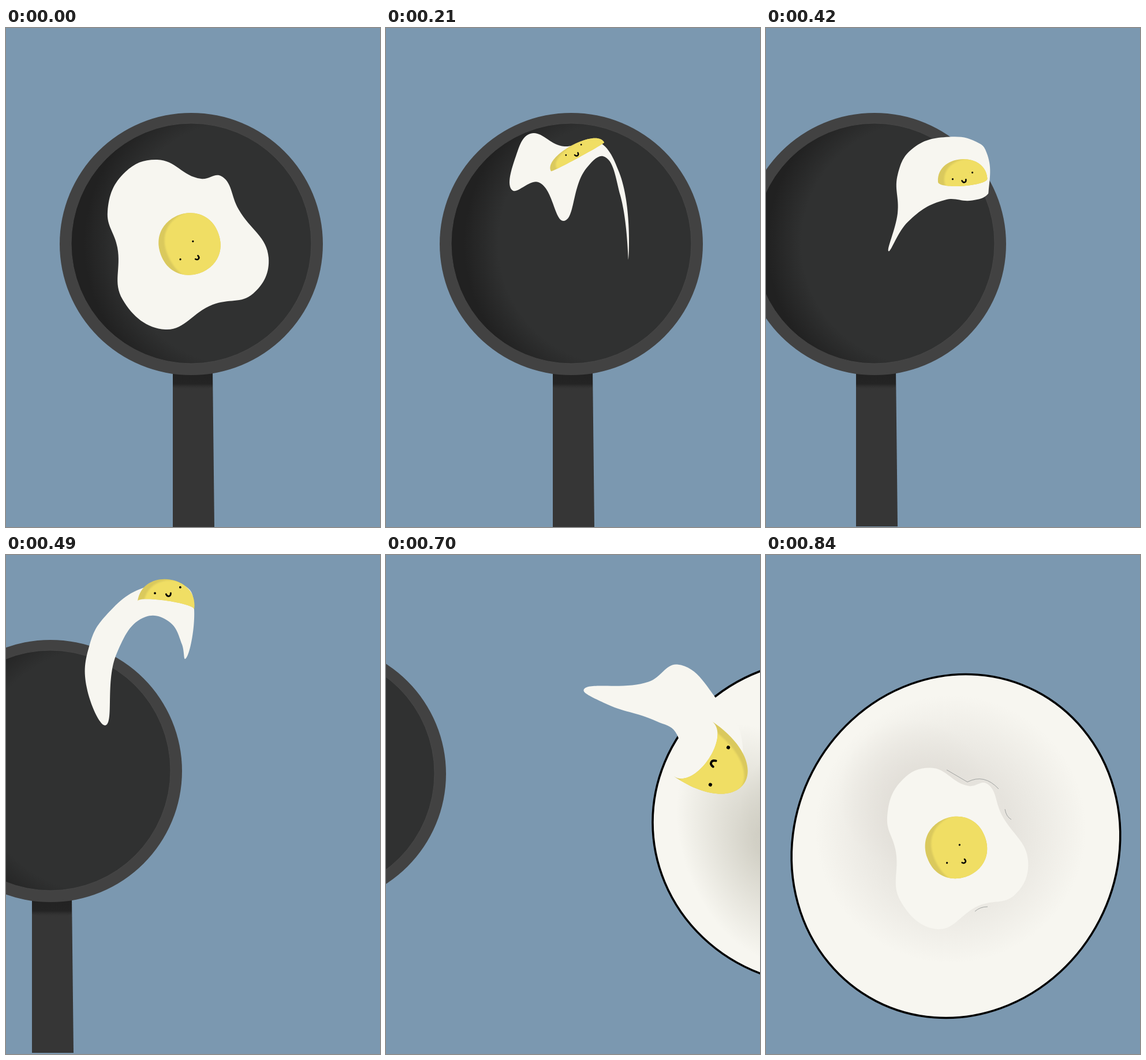
An HTML page with a canvas for the animation above (0.91 s loop, 648 by 864 pixels).

```html
<!DOCTYPE html>
<html lang="en">
<head>
<meta charset="utf-8">
<title>Flipping egg</title>
<style>
  html, body { margin: 0; width: 100%; height: 100%; overflow: hidden; background: #7b98b0; }
  canvas { display: block; }
</style>
</head>
<body>
<canvas id="stage" width="648" height="864"></canvas>
<script>
const ctx = document.getElementById('stage').getContext('2d');
const STEP = 70, STEPS = 13, TAU = Math.PI * 2;
const SKY = '#7b98b0', WHITE = '#f7f6f0', YOLK = '#f0de64', YOLK_DARK = '#dac95d';

// white: key points of a smooth outline, clockwise.
// yolk: two tips, then the bulge of the outer and the inner arc between them.
// face: centre between the eyes, angle, distance of the eyes, drop of the mouth.
const resting = {
  step: 0,
  white: [338,261, 372,256, 403,314, 455,398, 428,460, 358,479,
    276,522, 202,470, 193,380, 176,318, 207,249, 262,228],
  yolk: [268,392, 368,356, 53.4, -53.4],
  face: [313,385, -0.96, 38, 23]
};
const tossed = {
  step: 3,
  white: [309,205, 362,194, 404,250, 420,401, 406,290, 376,222,
    347,243, 308,334, 264,267, 219,281, 225,222, 250,183],
  yolk: [286,248, 378,198, 22, -2],
  face: [325,211, -0.6, 32, 10]
};
const caught = {
  step: 5,
  white: [425,343, 434,327, 461,388, 464,420, 433,482, 380,488,
    300,501, 253,478, 316,412, 312,350, 333,314, 385,324],
  yolk: [368,453, 441,427, 28, -28],
  face: [401,451, -0.41, 27, 11]
};
const flung = {
  step: 7,
  white: [315,57, 326,94, 310,180, 305,155, 282,115, 242,107,
    192,170, 172,295, 140,230, 145,155, 172,106, 250,53],
  yolk: [228,80, 326,94, 45, 8],
  face: [280,61, -0.23, 45, 8]
};
const flying = {
  step: 9,
  white: [602,131, 605,215, 545,248, 492,242, 504,205, 470,163,
    438,174, 375,186, 323,170, 410,113, 437,70, 560,107],
  yolk: [526,124, 513,249, 113, 28],
  face: [578,195, 1.57, 70, 13]
};
const landing = {
  step: 11,
  white: [625,480, 600,560, 525,550, 472,496, 508,494, 533,450,
    500,402, 378,325, 362,298, 500,326, 572,309, 612,425],
  yolk: [601,450, 484,517, 103, 39],
  face: [577,536, 2.47, 73, 11]
};
const moved = (v, i) => v + [11.5, 132.5][i % 2];
const served = {
  step: 12,
  white: resting.white.map((v, i) => i % 2 ? v * 0.95 + 152 : v * 0.875 + 56),
  yolk: [...resting.yolk.slice(0, 4).map(moved), ...resting.yolk.slice(4)],
  face: [...resting.face.slice(0, 2).map(moved), ...resting.face.slice(2)]
};
const poses = [resting, tossed, caught, flung, flying, landing, served];

const mix = (a, b, k) => a.map((v, i) => v + (b[i] - v) * k);

function poseAt(step) {
  const i = poses.findIndex(p => p.step >= step);
  const next = poses[i], prev = poses[Math.max(i - 1, 0)];
  const k = (step - prev.step) / (next.step - prev.step || 1);
  const part = name => mix(prev[name], next[name], k);
  return { white: part('white'), yolk: part('yolk'), face: part('face') };
}

// Handles shrink where the outline turns back, so tips stay sharp.
function blob(coords) {
  const n = coords.length / 2;
  const at = i => { const j = (i + n) % n * 2; return [coords[j], coords[j + 1]]; };
  const side = i => {
    const [ax, ay] = at(i), [bx, by] = at(i + 1);
    const length = Math.hypot(bx - ax, by - ay);
    return { x: (bx - ax) / length, y: (by - ay) / length, length };
  };
  const heading = i => {
    const a = side(i - 1), b = side(i);
    return [(a.x + b.x) / 2, (a.y + b.y) / 2];
  };
  const path = new Path2D();
  path.moveTo(...at(0));
  for (let i = 0; i < n; i++) {
    const [x, y] = at(i), [u, v] = at(i + 1);
    const h = side(i).length * 0.42;
    const [ax, ay] = heading(i), [bx, by] = heading(i + 1);
    path.bezierCurveTo(x + ax * h, y + ay * h, u - bx * h, v - by * h, u, v);
  }
  path.closePath();
  return path;
}

function yolkPath([ax, ay, bx, by, outer, inner]) {
  const d = Math.hypot(bx - ax, by - ay);
  const nx = (by - ay) / d * 4 / 3, ny = (ax - bx) / d * 4 / 3;
  const path = new Path2D();
  path.moveTo(ax, ay);
  path.bezierCurveTo(ax + nx * outer, ay + ny * outer, bx + nx * outer, by + ny * outer, bx, by);
  path.bezierCurveTo(bx + nx * inner, by + ny * inner, ax + nx * inner, ay + ny * inner, ax, ay);
  return path;
}

function ellipse(x, y, rx, ry, fill, tilt = 0) {
  ctx.beginPath();
  ctx.ellipse(x, y, rx, ry, tilt, 0, TAU);
  ctx.fillStyle = fill;
  ctx.fill();
}

function line(d, color, width) {
  ctx.strokeStyle = color;
  ctx.lineWidth = width;
  ctx.stroke(new Path2D(d));
}

function softSpot(x, y, rx, ry, rgb, alpha, tilt = 0, core = 0) {
  const g = ctx.createRadialGradient(0, 0, 0, 0, 0, 1);
  g.addColorStop(core, `rgba(${rgb},${alpha})`);
  g.addColorStop((1 + core) / 2, `rgba(${rgb},${alpha * 0.5})`);
  g.addColorStop(1, `rgba(${rgb},0)`);
  ctx.save();
  ctx.translate(x, y);
  ctx.rotate(tilt);
  ctx.scale(rx, ry);
  ellipse(0, 0, 1, 1, g);
  ctx.restore();
}

function drawPan(step) {
  const s = Math.max(step - 5, 0);
  const shift = 144 * s - 11 * s * s;
  ctx.save();
  ctx.translate(-shift, step >= 9 ? 5 : 0);

  ctx.fillStyle = '#363636';
  ctx.fill(new Path2D(`M289 590H358L361 ${864 - shift / 122}H289Z`));
  const cast = ctx.createLinearGradient(0, 600, 0, 627);
  cast.addColorStop(0, '#222222');
  cast.addColorStop(0.6, '#242424');
  cast.addColorStop(1, '#36363600');
  ctx.fillStyle = cast;
  ctx.fill(new Path2D('M289 590H358V622Q324 632 289 622Z'));

  ellipse(321, 374, 228, 227, '#424242');
  ellipse(321, 373, 208, 208, '#303131');
  const shadow = ctx.createRadialGradient(405, 373, 210, 405, 373, 270);
  shadow.addColorStop(0, 'rgba(33,33,33,0)');
  shadow.addColorStop(1, 'rgba(33,33,33,1)');
  ellipse(321, 373, 208, 208, shadow);
  ctx.strokeStyle = '#4c4c4c';
  ctx.lineWidth = 0.8;
  ctx.stroke();
  ctx.restore();
}

function drawPlate(step) {
  const k = STEPS - 1 - step;
  const x = 329 + 287 * k - 36 * k * k, y = 504 - 30 * k + 4.7 * k * k;
  const rx = 302 - 2.5 * k, ry = 280 + k, tilt = k ? 0 : -1.094;

  ellipse(x, y, rx, ry, WHITE, tilt);
  ctx.save();
  ctx.clip();
  ctx.translate(x, y);
  if (k === 0) {
    softSpot(-9, -29, 235, 232, '224,221,215', 0.75, 0, 0.45);
    softSpot(-74, -89, 130, 130, '220,216,209', 0.6);
  } else if (k < 3) {
    softSpot(-105, 37, 140, 215, '206,204,193', 0.9, -0.35, 0.1);
    softSpot(-60, -28, 85, 95, '200,198,187', 0.6);
    softSpot(75, -148, 175, 85, '212,210,201', 0.8);
  }
  ctx.restore();

  ctx.beginPath();
  ctx.ellipse(x, y, rx, ry, tilt, 0, TAU);
  ctx.strokeStyle = '#000';
  ctx.lineWidth = 3.6;
  ctx.stroke();
  if (k === 1) {
    ctx.fillStyle = '#000';
    ctx.fill(new Path2D('M297 574Q322 640 362 681V672Q325 625 297 574Z'));
  }
}

function drawFace([x, y, angle, spread, drop]) {
  ctx.save();
  ctx.translate(x, y);
  ctx.rotate(angle);
  for (const side of [-1, 1]) ellipse(side * spread / 2, 0, spread * 0.043, spread * 0.043, '#000');
  ctx.translate(0, drop);
  ctx.scale(0.4 + spread * 0.014, 0.4 + spread * 0.014);
  ctx.lineCap = 'round';
  line('M-4 -2C-3 4 3 4 4 -2', '#000', 2.8);
  ctx.restore();
}

function drawYolk(yolk) {
  const shape = yolkPath(yolk);
  ctx.fillStyle = YOLK_DARK;
  ctx.fill(shape);

  // The lit part slides from the first tip towards the second.
  const [ax, ay, bx, by, outer, inner] = yolk;
  const slide = 11 / Math.hypot(bx - ax, by - ay);
  ctx.save();
  ctx.clip(shape);
  ctx.translate((bx - ax) * slide, (by - ay) * slide);
  ctx.filter = 'blur(1.5px)';
  ctx.fillStyle = YOLK;
  ctx.fill(yolkPath([ax, ay, bx, by, outer, inner - 15]));
  ctx.restore();
}

function drawEgg({ white, yolk, face }) {
  ctx.fillStyle = WHITE;
  ctx.fill(blob(white));
  drawYolk(yolk);
  drawFace(face);
}

function draw(step) {
  ctx.fillStyle = SKY;
  ctx.fillRect(0, 0, 648, 864);
  if (step < 11) drawPan(step);
  if (step >= 9) drawPlate(step);
  drawEgg(poseAt(step));
  if (step === 12) {
    line('M313 372L349 393Q378 378 403 405M414 440Q416 453 425 458M362 617Q371 609 384 609', '#8d9190', 0.8);
  }
}

function tick() {
  draw(Math.floor(performance.now() / STEP) % STEPS);
  requestAnimationFrame(tick);
}
tick();
</script>
</body>
</html>
```
